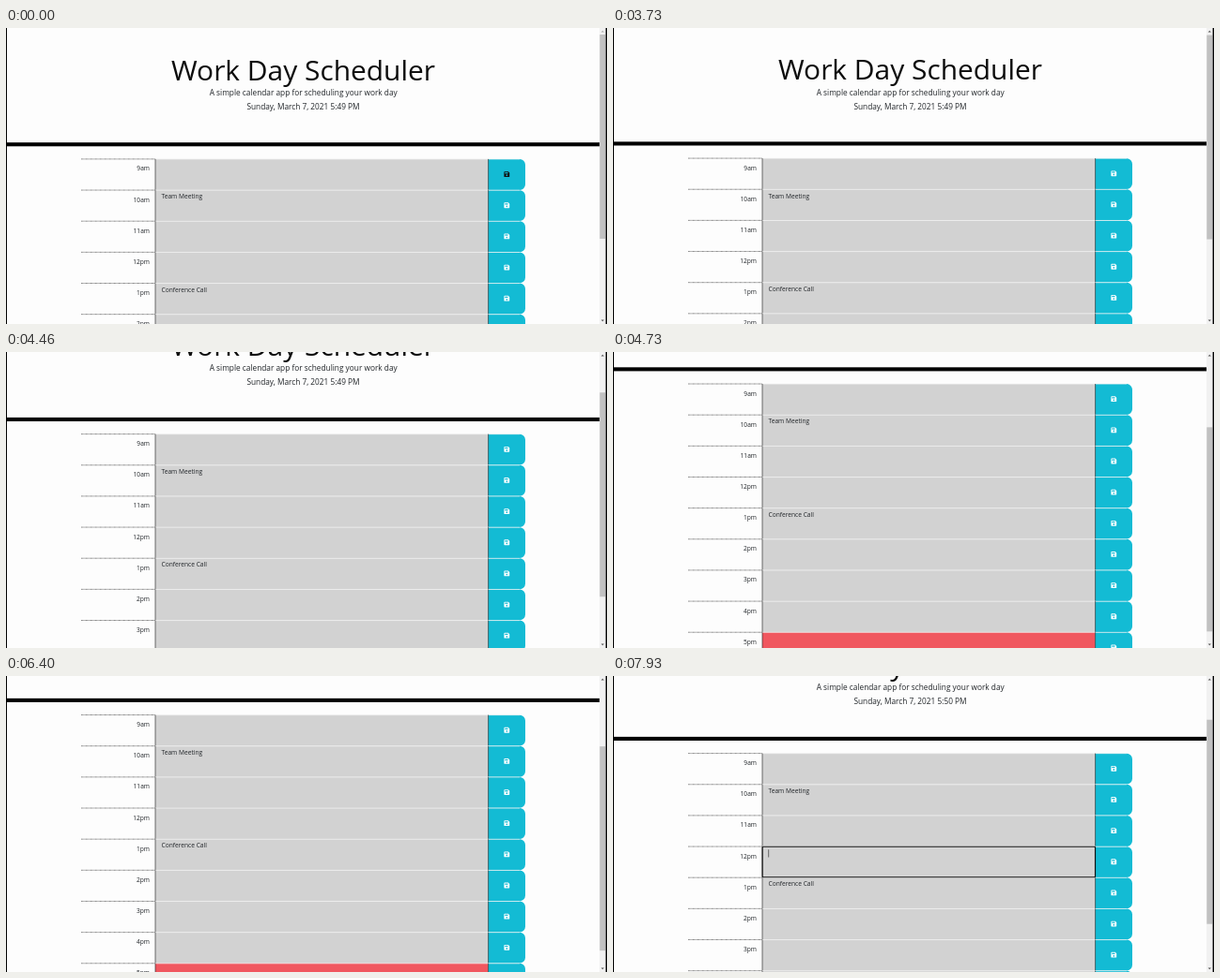
Recreate the animation shown at these times as an HTML page. Size 640x316 px, loop 8000 ms.

```html
<!DOCTYPE html>
<html lang="en">
<head>
<meta charset="utf-8">
<title>Work Day Scheduler</title>
<style>
  html, body { margin: 0; width: 100%; height: 100%; overflow: hidden; background: #fdfdfd; }
  svg { display: block; width: 100%; height: 100%; }
  text { font-family: "Open Sans", sans-serif; fill: #212529; }
  .hour, .task { font-size: 6.64px; }
  .hour { text-anchor: end; }
  .head { text-anchor: middle; font-size: 8.3px; }
  .title { font-size: 29.9px; fill: #0c0c0c; }
</style>
</head>
<body>
<svg viewBox="0 0 640 316" preserveAspectRatio="none">
  <rect width="640" height="316" fill="#fdfdfd"/>
  <g id="page">
    <text class="head title" x="316.5" y="56">Work Day Scheduler</text>
    <text class="head" x="316.7" y="72.4">A simple calendar app for scheduling your work day</text>
    <text class="head" id="date" x="316.5" y="87.4"></text>
    <rect x="1" y="122.2" width="631" height="4.1"/>
    <g id="rows"></g>
    <g id="focus">
      <rect x="159.1" y="239.6" width="354.4" height="32.4" rx="1" fill="none" stroke="#111" stroke-width="1.1"/>
      <rect id="caret" x="165.5" y="242.6" width=".6" height="8.2" fill="#222"/>
    </g>
  </g>
  <rect x="632" width="6.6" height="316" fill="#f1f1f1"/>
  <rect id="thumb" x="632.3" width="6" height="218" fill="#c1c1c1"/>
  <path id="up" d="M633.7 4.6l1.6-1.8 1.6 1.8z"/>
  <path d="M633.7 311.4l1.6 1.8 1.6-1.8z" fill="#505050"/>
  <rect width="1" height="316"/>
  <rect x="638.6" width="1.4" height="316"/>
</svg>
<script>
const $ = id => document.getElementById(id);
const TOP = 139.9, PITCH = 33.15, FPS = 15, LOOP = 8000;
const hours = ["9am", "10am", "11am", "12pm", "1pm", "2pm", "3pm", "4pm", "5pm"];
const tasks = { "10am": "Team Meeting", "1pm": "Conference Call" };
const TEAL = "#13bbd4";

function row(hour, i) {
  const fill = hour === "5pm" ? "#f0575f" : "#d2d2d2";
  return `<g transform="translate(0 ${TOP + i * PITCH})">
    <path d="M80 0H159" stroke="#555" stroke-width=".75" stroke-dasharray=".9 .35"/>
    <text class="hour" x="153" y="12.5">${hour}</text>
    <rect x="159" width="354.5" height="${PITCH}" fill="${fill}"/>
    <text class="task" x="165.5" y="9.3">${tasks[hour] || ""}</text>
    <path d="M513.5 .1H547a6 6 0 0 1 6 6V27a6 6 0 0 1-6 6H513.5z" fill="${TEAL}"/>
    <path d="M159 .1H547" stroke="#f4f4f4" stroke-width=".7"/>
    <path d="M159 0V${PITCH}M513.6 0V${PITCH}" stroke="#333" stroke-width=".7"/>
    <g transform="translate(530.4 13.3)">
      <path class="disk" d="M.6 0H4.4L5.8 1.4V5.2a.6.6 0 0 1-.6.6H.6a.6.6 0 0 1-.6-.6V.6A.6.6 0 0 1 .6 0z" fill="#fff"/>
      <path d="M.9 .9H4.1V2.2H.9z" fill="${TEAL}"/>
      <circle cx="2.9" cy="4" r=".85" fill="${TEAL}"/>
    </g>
  </g>`;
}
$("rows").innerHTML = hours.map(row).join("");
const firstDisk = document.querySelector(".disk");

// Scroll gestures: [first tick, last tick, from, to]
const moves = [[55, 63, 0, 50.8], [66, 73, 50.8, 115.2], [91, 104, 115.2, 57.3]];
const ease = x => x * x * x * (10 - 15 * x + 6 * x * x);

function scrollAt(tick) {
  let y = 0;
  for (const [start, end, from, to] of moves) {
    if (tick < start) break;
    y = from + (to - from) * ease(Math.min(1, (tick - start) / (end - start)));
  }
  return y;
}

function draw(ms) {
  const tick = Math.floor((ms + 7) * FPS / 1000);
  const y = scrollAt(tick);
  $("page").setAttribute("transform", `translate(0 ${-y})`);
  $("thumb").setAttribute("y", 7 + y * 0.693);
  $("up").setAttribute("fill", y > 0 ? "#505050" : "#a8a8a8");
  $("date").textContent = `Sunday, March 7, 2021 5:${tick < 102 ? 49 : 50} PM`;
  firstDisk.setAttribute("fill", tick < 1 ? "#111" : "#fff");
  $("focus").setAttribute("visibility", tick >= 113 ? "visible" : "hidden");
}

function loop() {
  draw(performance.now() % LOOP);
  requestAnimationFrame(loop);
}
loop();
</script>
</body>
</html>
```
